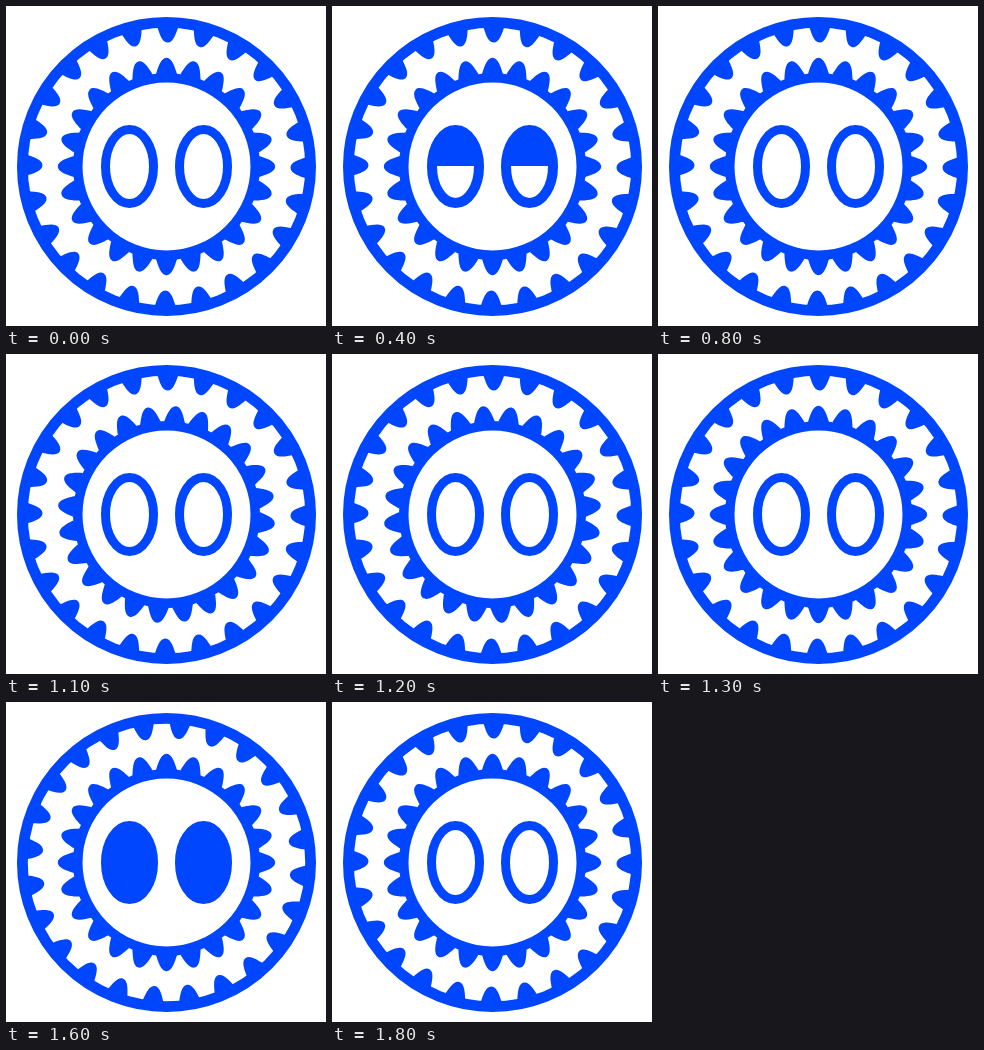
An HTML page with a canvas for the animation above (2 s loop, 320 by 320 pixels).

```html
<!DOCTYPE html>
<html lang="en">
<head>
<meta charset="utf-8">
<title>Blinking gears</title>
<style>
  html, body { margin: 0; width: 100%; height: 100%; overflow: hidden; background: #fff; }
  canvas { display: block; width: 100vmin; height: 100vmin; }
</style>
</head>
<body>
<canvas width="320" height="320"></canvas>
<script>
const ctx = document.querySelector('canvas').getContext('2d');
const BLUE = '#0046ff', CENTER = 160.5, TAU = Math.PI * 2;
const LOOP = 2000, STEP = 100, TEETH = 24;

function ring(inner, outer) {
  ctx.lineWidth = outer - inner;
  ctx.beginPath();
  ctx.arc(0, 0, (inner + outer) / 2, 0, TAU);
  ctx.stroke();
}

// Rounded teeth between two radii; shift is the turn in pitches, clockwise.
function teeth(shift, base, tip, halfWidth) {
  const height = tip - base, foot = base - Math.sign(height);
  const shoulder = base + height * 0.35;
  for (let i = 0; i < TEETH; i++) {
    ctx.save();
    ctx.rotate((i + shift) * TAU / TEETH);
    ctx.beginPath();
    ctx.moveTo(-halfWidth, -foot);
    ctx.bezierCurveTo(-halfWidth * 0.8, -shoulder, -halfWidth * 0.55, -tip, 0, -tip);
    ctx.bezierCurveTo(halfWidth * 0.55, -tip, halfWidth * 0.8, -shoulder, halfWidth, -foot);
    ctx.fill();
    ctx.restore();
  }
}

function eye(x, lid) {
  const rim = lid ? 10 : 9;
  ctx.lineWidth = rim;
  ctx.beginPath();
  ctx.ellipse(x, 0, 28.5 - rim / 2, 41.5 - rim / 2, 0, 0, TAU);
  ctx.stroke();
  if (!lid) return;
  ctx.beginPath();
  ctx.ellipse(x, -0.5, 25, 38, 0, lid === 1 ? 0 : Math.PI, TAU);
  ctx.fill();
}

// Fraction of a pitch turned: one pitch in three equal steps.
const turn = (tick, start) => Math.min(Math.max(tick - start + 1, 0), 3) / 3 % 1;

// The lid is half down on the first and last tick of a blink.
function blink(tick, first, last) {
  if (tick < first || tick > last) return 0;
  return tick === first || tick === last ? 0.5 : 1;
}

function draw(now) {
  const tick = Math.floor(now % LOOP / STEP);
  ctx.setTransform(1, 0, 0, 1, 0, 0);
  ctx.fillStyle = '#fff';
  ctx.fillRect(0, 0, 320, 320);
  ctx.translate(CENTER, CENTER);
  ctx.fillStyle = ctx.strokeStyle = BLUE;

  ring(138.7, 149.5);
  teeth(0.035 - turn(tick, 15), 138.7, 124, 10.5);
  ring(84, 93.5);
  teeth(turn(tick, 11), 93.5, 108.7, 10.5);

  const lid = blink(tick, 4, 7) || blink(tick, 15, 17);
  eye(-37, lid);
  eye(37, lid);
  requestAnimationFrame(draw);
}
requestAnimationFrame(draw);
</script>
</body>
</html>
```
